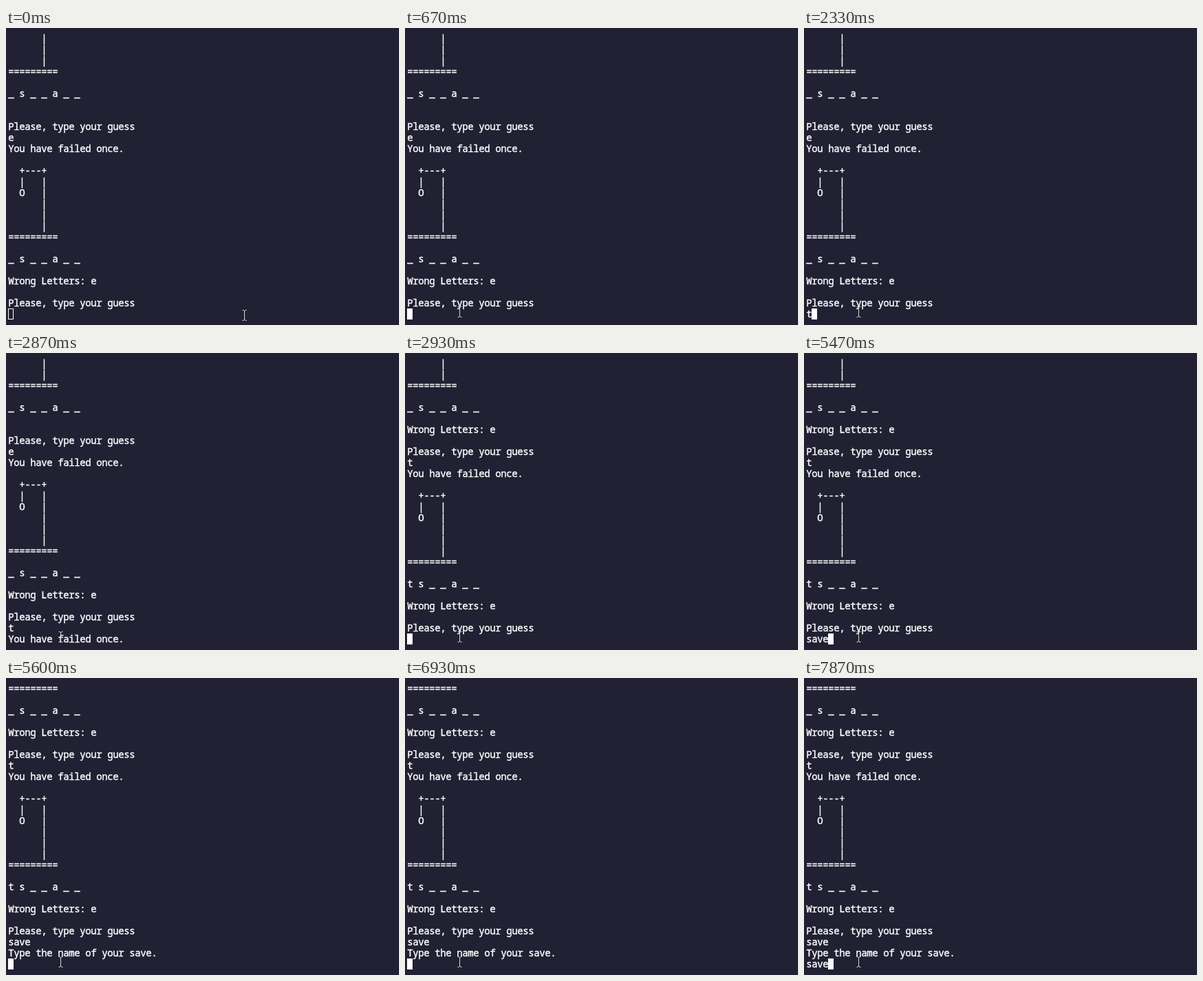
An HTML page that plays this animation: 571x431 px, repeating every 8 s.

```html
<!DOCTYPE html>
<html lang="en">
<head>
<meta charset="utf-8">
<title>Hangman terminal</title>
<style>
  html, body { margin: 0; width: 100%; height: 100%; overflow: hidden; background: #212133; }
  svg { display: block; width: 571px; height: 431px; }
  text {
    font: 14px "Noto Sans Mono", "DejaVu Sans Mono", monospace;
    letter-spacing: -0.4px; white-space: pre;
    fill: #fff; stroke: #fff; stroke-width: 0.4px;
  }
</style>
</head>
<body>
<svg viewBox="0 0 571 431">
  <rect width="571" height="431" fill="#212133"/>
  <g id="screen"></g>
  <rect id="caret" stroke="#fff" width="7" height="15" y="407.5"/>
  <path id="pointer" d="M-3 -7.5H-1M1 -7.5H3M-1 -6.5H1M0 -7V7M-1 6.5H1M-3 7.5H-1M1 7.5H3" fill="none" stroke="#d4d4d4"/>
</svg>
<script>
const LOOP = 8000, ROWS = 26, CELL = 8, LINE = 16, LEFT = 3, TOP = 7, BASE = 13;

const post = "      |";
const base = "=========";
const gallows = ["  +---+", "  |   |", "  O   |", post, post, post, base];
const ask = "Please, type your guess";
const failed = "You have failed once.";
const wrong = "Wrong Letters: e";

const round = word => [failed, "", ...gallows, "", word, "", wrong, "", ask];
const log = [
  post, post, post, base, "", "_ s _ _ a _ _", "", "", ask, "e",
  ...round("_ s _ _ a _ _"), "t",
  ...round("t s _ _ a _ _"), "save",
  "Type the name of your save."
];

// time, finished log lines, typed text (null: no prompt yet), caret filled
const states = [
  [0, 25, "", false],
  [670, 25, "", true],
  [2330, 25, "t", true],
  [2870, 27, null, false],
  [2930, 41, "", true],
  [5000, 41, "s", true],
  [5200, 41, "sa", true],
  [5330, 41, "sav", true],
  [5470, 41, "save", true],
  [5600, 43, "", true],
  [5800, 43, "", false],
  [6930, 43, "", true],
  [7470, 43, "s", true],
  [7670, 43, "sa", true],
  [7770, 43, "sav", true],
  [7870, 43, "save", true]
];

const $ = id => document.getElementById(id);
const screen = $("screen"), caret = $("caret"), pointer = $("pointer");
const rows = Array.from({ length: ROWS }, (_, i) => {
  const row = document.createElementNS("http://www.w3.org/2000/svg", "text");
  row.setAttribute("x", LEFT + 0.2);
  row.setAttribute("y", TOP + i * LINE + BASE);
  return screen.appendChild(row);
});
let shown = null;

function showState(state) {
  if (state === shown) return;
  shown = state;
  const [, count, typed, filled] = state;
  const lines = log.slice(0, count);
  if (typed !== null) lines.push(typed);
  lines.slice(-ROWS).forEach((line, i) => { rows[i].textContent = line; });
  caret.style.display = typed === null ? "none" : "";
  caret.setAttribute("x", LEFT + 0.5 + (typed || "").length * CELL);
  caret.setAttribute("fill", filled ? "#fff" : "none");
}

// The pointer advances in seven steps, rising a little on its way left.
function movePointer(t) {
  const step = t < 70 ? 0 : Math.min(7, 1 + Math.floor((t - 70) / 66.7));
  const p = step / 7, ease = p * p * (3 - 2 * p);
  const x = Math.round(346 - 267 * ease) + 0.5;
  const y = Math.round(417 - 5 * ease - 7 * Math.sin(Math.PI * ease));
  pointer.setAttribute("transform", `translate(${x} ${y})`);
}

function render(t) {
  showState(states.findLast(state => state[0] <= t));
  movePointer(t);
}

const start = performance.now();
function tick() {
  render((performance.now() - start) % LOOP);
  requestAnimationFrame(tick);
}
tick();
</script>
</body>
</html>
```
